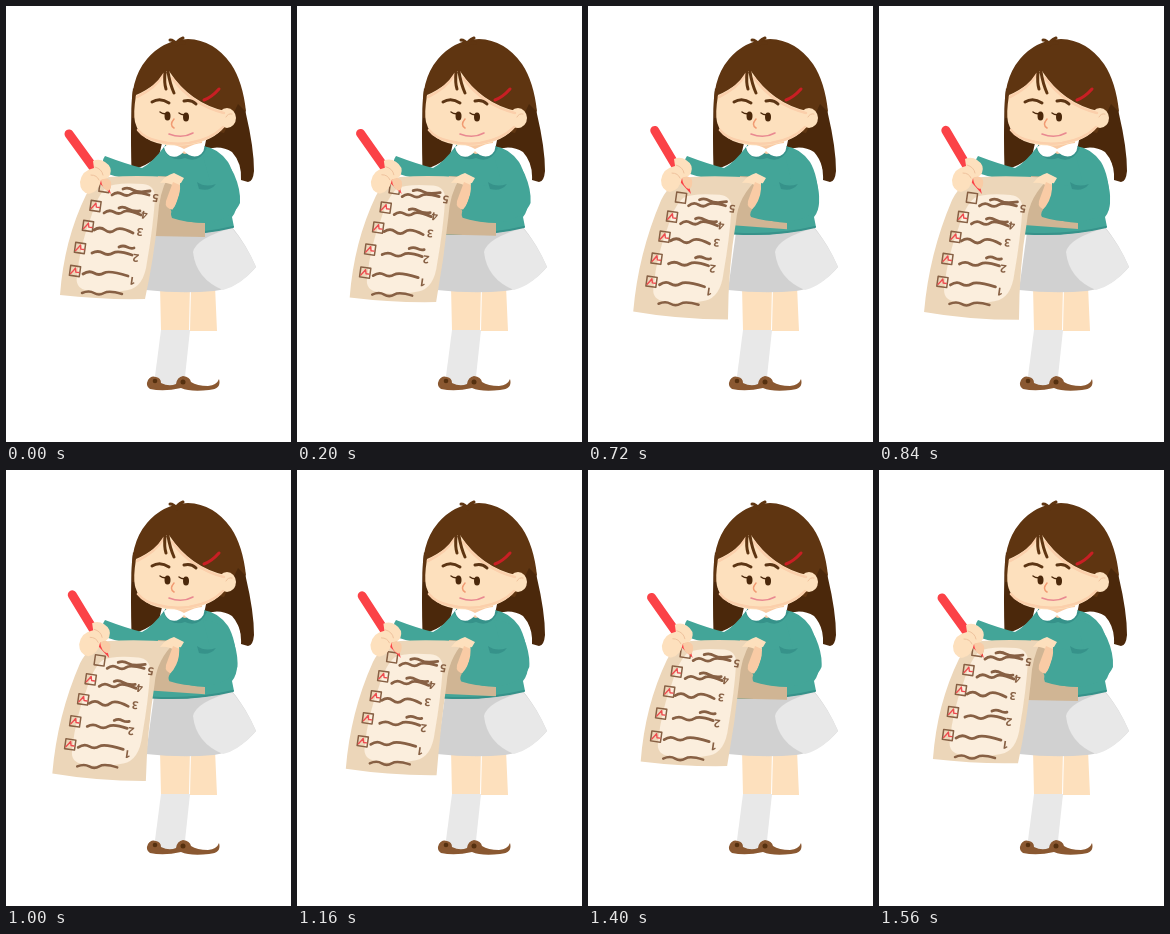
Animation, 285 px wide and 436 px high, one loop 1.6 s. Source, as an HTML page:

```html
<!DOCTYPE html>
<html lang="en">
<head>
<meta charset="utf-8">
<title>Checklist</title>
<style>
html, body { margin: 0; width: 100%; height: 100%; overflow: hidden; background: #fff; }
svg { display: block; width: 100%; height: 100%; }
.line { fill: none; stroke-linecap: round; stroke-linejoin: round; }
.skin { fill: #fde0bd; }
.blush { fill: #f9cba5; }
.hair { fill: #5f3511; }
.deep { fill: #4b280b; }
.knit { fill: #43a598; }
.fold { fill: #36928a; }
.ink { stroke: #876044; }
text { font: bold 11px "Open Sans", sans-serif; fill: #876044; text-anchor: middle; }
</style>
</head>
<body>
<svg viewBox="0 0 285 436">
  <!-- back hair -->
  <path class="deep" d="M127 82Q124 112 125.500 164Q139 161 153 150L160 120ZM222 57Q236 77 240 108Q248 142 248 165Q247 176 242 176L235 174Q236 157 226 146Q214 138 198 144L205 110Z"/>

  <!-- legs and shoes -->
  <path class="skin" d="M154 280H184L183 325H155ZM185 280H209L211 325H184Z"/>
  <path fill="#e8e8e8" d="M155 324H184L178 380Q162 384 148 378Z"/>
  <path fill="#fff" d="M185 360H211L213 374Q211 380 199 380Q187 380 184 376Z"/>
  <path fill="#8a5831" d="M142 374Q145 369 150 371Q155 372 155 377Q163 381 170 378Q171 371 177 370Q184 371 185 376Q191 380 202 380Q211 379 213 373Q216 383 203 384Q184 386 175 382Q158 386 144 383Q139 380 142 374Z"/>
  <g fill="#55300f"><circle cx="149" cy="375" r="2.300"/><circle cx="177" cy="376" r="2.500"/></g>

  <!-- skirt -->
  <path fill="#d1d1d1" d="M148 226L226 221Q240 238 250 261Q232 282 208 285Q175 288 140 284Z"/>
  <path fill="#e8e8e8" d="M226 222Q240 238 250 261Q234 280 217 284Q190 273 187 246Q190 232 226 222Z"/>

  <!-- sweater -->
  <path class="knit" d="M158 141Q146 157 136 162Q120 158 99 150Q94 156 99 167Q124 176 149 172L144 228Q190 231 228 221L226 211Q231 205 231 196Q230 169 222 156Q212 142 197 140L179 151Z"/>
  <path class="line" stroke="#36928a" stroke-width="2" d="M146 227.500Q190 230 227 221"/>
  <path class="fold" d="M157 143Q166 157 179 152Q193 158 201 142L196 138H160Z"/>
  <path class="blush" d="M160 130H196V142L179 148L160 142Z"/>
  <path fill="#fff" d="M158 141Q164 135 178 143Q191 136 198 137Q200 146 192 150Q184 152 178 145Q172 153 164 150Q159 147 158 141Z"/>

  <!-- head -->
  <path class="hair" d="M126 112Q123 74 141 53Q157 34 182 33Q208 34 225 58Q237 76 240 106L232 98L218 127L150 112Z"/>
  <path class="line" stroke="#5f3511" stroke-width="3" d="M164 34Q168 34 171 39Q171 34 177 32M168 38L178 37"/>
  <ellipse class="skin" cx="221" cy="112" rx="9" ry="10"/>
  <path class="line" stroke="#efc29d" stroke-width="1" d="M220 111Q222 107 226 108"/>
  <path class="skin" d="M159 65Q151 80 130 89Q127 108 129 116Q132 129 145 135Q160 141 182 139Q208 135 219 120L219 105Q184 97 163 65Z"/>
  <path class="line" stroke="#fbcfab" stroke-width="2.500" d="M158 68Q150 82 131 91M166 72Q186 99 218 107M132 124Q138 132 152 135Q166 139 183 137Q206 133 217 121"/>
  <path class="line" stroke="#5f3511" stroke-width="3" d="M159 66Q158 77 160 83M162 66Q164 78 168 87"/>
  <path class="line" stroke="#c81f24" stroke-width="3" d="M198 94Q206 91 213 83"/>
  <path class="line" stroke="#5c3514" stroke-width="3" d="M146 96Q154 91 163 97M178 95Q185 93 190 98"/>
  <g class="deep"><ellipse cx="161.500" cy="110" rx="3" ry="4.500"/><ellipse cx="180" cy="111" rx="3" ry="4.500"/></g>
  <path class="line" stroke="#4b280b" stroke-width="1.400" d="M154 106Q158 109 162 107M173 107Q177 110 181 108"/>
  <path class="line" stroke="#f19a72" stroke-width="1.500" d="M168 113Q163 119 168 122"/>
  <path class="line" stroke="#e98991" stroke-width="1.600" d="M163 128Q176 133 187 127"/>

  <!-- sheet -->
  <path fill="#d0b594" id="back"/>
  <path fill="#ecd6b9" id="sheet"/>
  <clipPath id="edge"><path id="edgePath"/></clipPath>
  <g clip-path="url(#edge)"><g id="notes">
    <path fill="#fbeedd" d="M101 181Q110 176 137 178Q149 179 149 192Q147 222 141 256Q138 281 122 284Q98 289 79 284Q69 281 71 270Q74 239 85 211Q92 188 101 181Z"/>
  </g></g>

  <!-- right hand and sleeve -->
  <path class="skin" d="M154 177Q160 169 168 167L178 172L172 182Q163 176 154 177Z"/>
  <path class="blush" d="M167 176L176 180L168 204Q158 203 160 195Z"/>
  <path class="knit" id="sleeve"/>
  <path class="fold" d="M191 176Q199 182 210 178Q204 186 193 183Z"/>

  <!-- left hand and pencil -->
  <g id="pencil">
    <path class="line" stroke="#fb4247" stroke-width="9" d="M63 128L95 172"/>
    <path fill="#fb4247" d="M91 175L99 170L105 188Z"/>
  </g>
  <g id="hand">
    <path class="skin" d="M87 155Q93 152 99 156Q107 161 104 169Q101 174 95 174Q93 186 83 188Q74 186 74 176Q76 164 88 162Z"/>
    <path class="blush" d="M95 174Q102 170 105 176Q106 183 102 185Q96 183 95 174Z"/>
    <path class="line" stroke="#efc29d" stroke-width="1" d="M89 161Q96 163 97 169M85 169Q91 169 93 174"/>
  </g>
</svg>
<script>
const $ = id => document.getElementById(id);

// Checkbox x, y; digit x, y; strokes
const rows = [
  [98.5, 181, 150, 192, "M106 189q5 -4 10 -1t9 0t18 1M117 183q5 -2 10 1t17 1"],
  [89.5, 200, 139, 209, "M98 207q5 -4 10 -1t9 0t18 3M113 202q4 -2 9 1t12 2"],
  [82, 220, 134.5, 226, "M88 224q6 -4 11 0t10 0t18 3"],
  [74, 242, 130.5, 252, "M86 247q6 -3 11 0t10 0t19 2M113 241q4 -2 8 0t7 1"],
  [69, 265, 127, 275, "M77 268q6 -4 11 -1t10 0t24 3"]
];
$("notes").innerHTML += rows.map(([x, y, dx, dy, d], i) => `
  <g transform="translate(${x} ${y}) rotate(8)" class="line">
    <path class="ink" stroke-width="1.5" d="M-5 -5H5V5H-5Z"/>
    ${i ? '<path stroke="#ee4c50" stroke-width="1.4" d="M-4 3Q-1 -1 0 -3L1 1L4 1"/>' : ""}
  </g>
  <text transform="translate(${dx} ${dy - 4}) rotate(188)">${5 - i}</text>
  <path class="line ink" stroke-width="2.8" d="${d}"/>`).join("") +
  '<path class="line ink" stroke-width="2.5" d="M76 287q7 -3 12 0t10 0t18 1"/>';

// Each moving outline has a raised and a lowered pose
const poses = {
  back: [
    "M152 170L172 171L164 202Q168 217 199 217L199 231L145 230Z",
    "M152 170L172 171L164 202Q168 215 199 217L199 223L145 219Z"],
  sheet: [
    "M103 171Q130 169 162 171Q153 188 152 210Q148 252 139 293Q98 294 54 289Q58 234 80 189Q88 174 103 171Z",
    "M103 171Q130 169 171 172Q150 190 148 215Q140 262 140 314Q90 314 45 306Q50 248 73 194Q83 174 103 171Z"],
  sleeve: [
    "M197 150Q220 151 228 168Q235 184 234 197Q228 211 208 216Q184 218 166 212Q163 207 169 200Q175 190 174 177Q186 181 205 178Z",
    "M197 150Q219 151 226 168Q232 184 231 197Q226 211 206 215Q182 217 163 211Q160 207 167 200Q174 190 173 177Q185 181 204 178Z"]
};
const mix = ([a, b], k) => {
  const end = b.match(/[\d.]+/g);
  let i = 0;
  return a.replace(/[\d.]+/g, n => (+n + (end[i++] - n) * k).toFixed(2));
};

const LOOP = 1600, STEP = 40;
function draw(now) {
  const t = Math.floor(now % LOOP / STEP) * STEP;
  const k = (1 - Math.cos(2 * Math.PI * t / LOOP)) / 2;
  for (const id in poses) $(id).setAttribute("d", mix(poses[id], k));
  $("edgePath").setAttribute("d", $("sheet").getAttribute("d"));
  $("notes").setAttribute("transform", `translate(${-5.6 * k} ${11 * k})`);
  $("pencil").setAttribute("transform", `translate(${-2 * k} 0) rotate(${5.5 * k} 104 187)`);
  $("hand").setAttribute("transform", `translate(${-k} ${-2 * k})`);
}

const start = performance.now();
(function tick() {
  draw(performance.now() - start);
  requestAnimationFrame(tick);
})();
</script>
</body>
</html>
```
